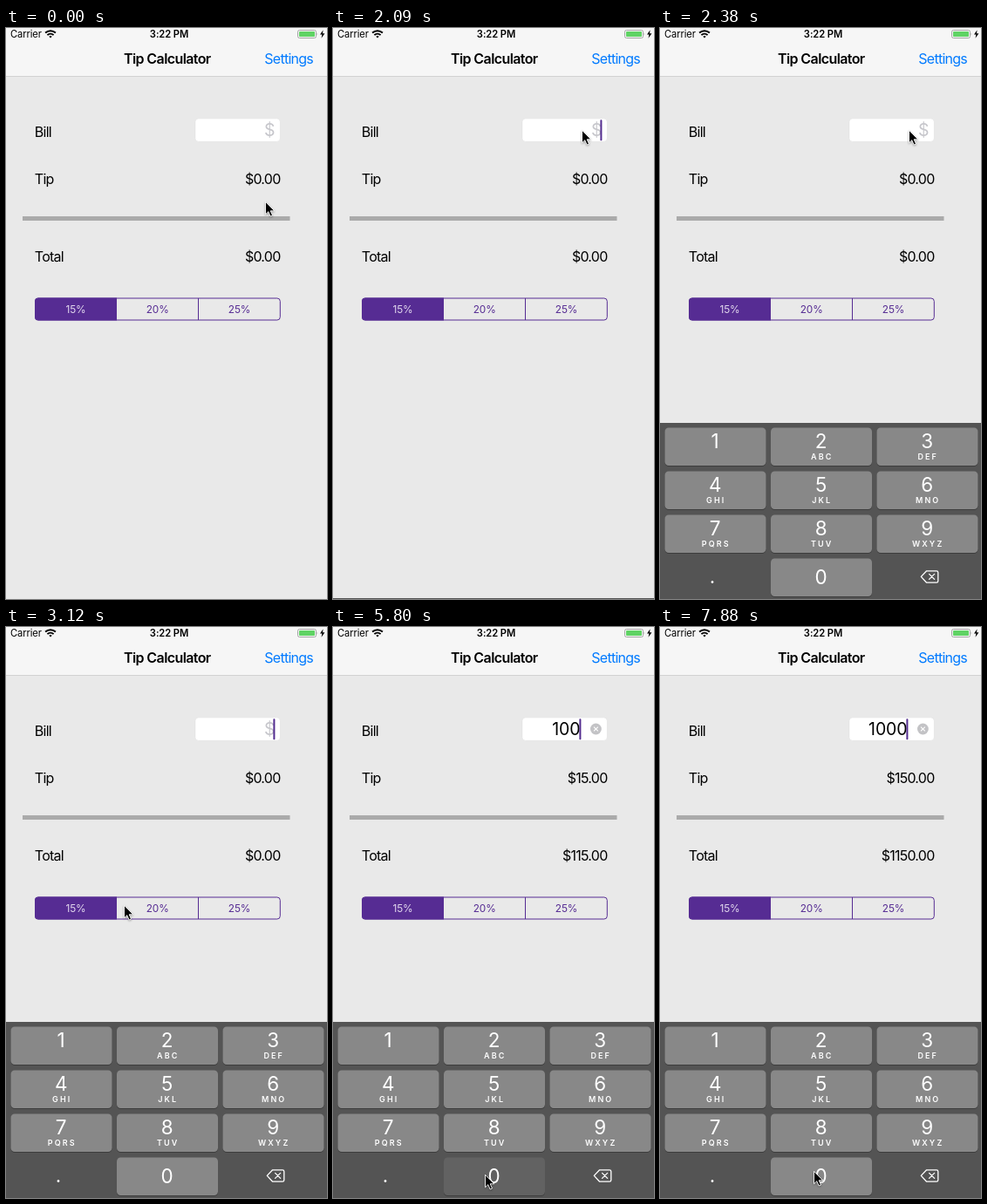
An HTML page that plays this animation: 368x655 px, repeating every 8 s.

```html
<!DOCTYPE html>
<html lang="en">
<head>
<meta charset="utf-8">
<title>Tip Calculator</title>
<style>
  html, body { margin: 0; width: 100%; height: 100%; overflow: hidden; background: #e9e9e9; }
  svg { display: block; width: 100%; height: 100%; }
  text { font: 16px Inter, "Liberation Sans", sans-serif; letter-spacing: -.75px; white-space: pre; }
  .end { text-anchor: end; }
  .mid { text-anchor: middle; }
  .title { font-weight: 600; letter-spacing: -.6px; }
  .status { font-size: 11.2px; letter-spacing: -.1px; }
  .bold { font-weight: 600; }
  .field { font-size: 19.5px; letter-spacing: -.1px; }
  .seg { font-size: 11.8px; letter-spacing: -.1px; fill: #562c93; }
  .digit { font-size: 22.5px; letter-spacing: 0; fill: #fff; }
  .letters { font-size: 9px; font-weight: 600; letter-spacing: 2.1px; fill: #fff; }
  #cursor { filter: drop-shadow(0 1px .8px rgba(0, 0, 0, .35)); }
</style>
</head>
<body>
<svg viewBox="0 0 368 655">
  <rect width="368" height="655" fill="#e9e9e9"/>

  <!-- status and navigation bars -->
  <rect width="368" height="55" fill="#f6f6f6"/>
  <rect y="55" width="368" height="1" fill="#d2d2d2"/>
  <text class="status" x="5" y="11">Carrier</text>
  <g fill="none" stroke="#000" stroke-width="2">
    <path d="M45.1 5.6a8.6 8.6 0 0 1 11.8 0M47.4 8.1a5.2 5.2 0 0 1 7.2 0"/>
    <path d="M49.3 9.8a2.6 2.6 0 0 1 3.4 0L51 11.6Z" fill="#000" stroke="none"/>
  </g>
  <text class="status bold mid" x="187" y="11">3:22 PM</text>
  <rect x="334.5" y="2.5" width="21" height="9" rx="2" fill="none" stroke="#a5a5a5"/>
  <rect x="336" y="4" width="18" height="6" rx=".8" fill="#5fd364"/>
  <path d="M356.6 5.2q1.4 1.8 0 3.6Z" fill="#a5a5a5"/>
  <path d="M363.6 2.2L360 7.6H362.4L361.5 11.8L365.4 6.2H362.9Z"/>
  <text class="title mid" x="184.8" y="41.2">Tip Calculator</text>
  <text class="end" x="352" y="41.2" fill="#007aff">Settings</text>

  <!-- form -->
  <text x="32.8" y="124.6">Bill</text>
  <text x="32.8" y="179.2">Tip</text>
  <text x="32.8" y="268.3">Total</text>
  <text id="tip" class="end" x="314.5" y="179.2"></text>
  <text id="total" class="end" x="314.5" y="268.3"></text>
  <rect x="19" y="216" width="306.5" height="5" fill="#aaa"/>
  <rect x="216.8" y="103.8" width="97.6" height="26.6" rx="4" fill="#fff" stroke="#dedede" stroke-width=".6"/>
  <text id="hint" class="field end" x="308.5" y="124.2" fill="#c7c7cc">$</text>
  <text id="bill" class="field end" x="283.5" y="124.2"></text>
  <g id="clear">
    <circle cx="301.4" cy="117" r="6.4" fill="#c3c3c6"/>
    <path d="M299 114.6l4.8 4.8m0-4.8l-4.8 4.8" stroke="#fff" stroke-width="1.1"/>
  </g>
  <rect id="caret" y="105.3" width="2" height="24" rx=".8" fill="#532c8f"/>

  <!-- percentage picker -->
  <rect x="33.5" y="310" width="280.8" height="25" rx="3.5" fill="none" stroke="#562c93"/>
  <path d="M127 309.5H37a4 4 0 0 0-4 4V331.5a4 4 0 0 0 4 4H127Z" fill="#562c93"/>
  <path d="M220.5 310V335" stroke="#562c93"/>
  <text class="seg mid" x="80" y="326.8" style="fill:#e3d9ee">15%</text>
  <text class="seg mid" x="173.7" y="326.8">20%</text>
  <text class="seg mid" x="267.6" y="326.8">25%</text>

  <g id="pad">
    <rect width="368" height="204" fill="#545454"/>
    <g id="keys"></g>
    <text class="digit mid" x="60" y="184">.</text>
    <g fill="none" stroke="#fff" stroke-width="1.3" stroke-linejoin="round" stroke-linecap="round">
      <path d="M299.3 176.4L305.6 169.8H317a1.8 1.8 0 0 1 1.8 1.8V181.4a1.8 1.8 0 0 1-1.8 1.8H305.6Z"/>
      <path d="M308.6 173.4l6 6m0-6l-6 6"/>
    </g>
  </g>

  <path id="cursor" d="M.5 .3V14.8L3.8 11.7L6.1 17L8.5 16L6.2 10.8H10.8Z" stroke="#fff" stroke-width=".9"/>
</svg>
<script>
const LOOP = 8000, TICK = 148.6;
const el = id => document.getElementById(id);
const letters = ['', 'ABC', 'DEF', 'GHI', 'JKL', 'MNO', 'PQRS', 'TUV', 'WXYZ'];

function key(digit, col, row, label) {
  const x = 5.5 + col * 121.5, y = 5.5 + row * 50, mid = x + 57.7;
  const baseline = y + (label === undefined ? 29 : 23.7);
  return `<rect x="${x}" y="${y + 1}" width="116" height="43.5" rx="4.5" fill="#3d3d3d"/>
    <rect id="key${digit}" x="${x}" y="${y}" width="116" height="43.5" rx="4.5" fill="#888"/>
    <text class="digit mid" x="${mid}" y="${baseline}">${digit}</text>
    <text class="letters mid" x="${mid + 1}" y="${y + 36.3}">${label || ''}</text>`;
}
el('keys').innerHTML =
  letters.map((s, i) => key(i + 1, i % 3, Math.floor(i / 3), s)).join('') + key(0, 1, 3);

// All times below are in ticks.
const FOCUS = 14, PRESS = 39;
const typed = [[29, '1'], [36, '10'], [39, '100'], [44, '1000']];
const path = [
  [0, 297, 199], [5, 285, 117], [16, 285, 117], [21, 135, 319], [25, 73, 470],
  [30, 73, 470], [31, 115, 536], [32, 160, 594], [33, 171, 618], [34, 174, 628],
  [52, 174, 628], [53, 176, 624], [54, 176, 624]
];

function cursorAt(t) {
  const i = path.findIndex(p => p[0] > t);
  const [t0, x0, y0] = path[i - 1], [t1, x1, y1] = path[i];
  const k = (t - t0) / (t1 - t0);
  return [x0 + (x1 - x0) * k, y0 + (y1 - y0) * k];
}

// The caret blinks with a period of seven ticks, restarted by typing.
function caretAlpha(t, start) {
  if (t < FOCUS) return 0;
  if (t < FOCUS + 2) return 1;
  const phase = (t - start) % 7;
  return phase < 4 ? 1 : phase === 4 ? .5 : 0;
}

function draw(t) {
  const [start, bill] = typed.filter(e => e[0] <= t).pop() || [FOCUS - 3, ''];
  el('bill').textContent = bill;
  el('tip').textContent = '$' + (bill * .15).toFixed(2);
  el('total').textContent = '$' + (bill * 1.15).toFixed(2);
  el('hint').style.display = bill ? 'none' : '';
  el('clear').style.display = bill ? '' : 'none';
  el('caret').setAttribute('x', bill ? 282.4 : 306.4);
  el('caret').setAttribute('opacity', caretAlpha(t, start));
  const top = t < FOCUS ? 656 : t === FOCUS ? 654 : t === FOCUS + 1 ? 477 : 453;
  el('pad').setAttribute('transform', `translate(0 ${top})`);
  el('key0').setAttribute('fill', t === PRESS ? '#626262' : '#888');
  el('cursor').setAttribute('transform', `translate(${cursorAt(t)})`);
}

function run() {
  draw(Math.floor((performance.now() % LOOP + 6) / TICK));
  requestAnimationFrame(run);
}
run();
</script>
</body>
</html>
```
